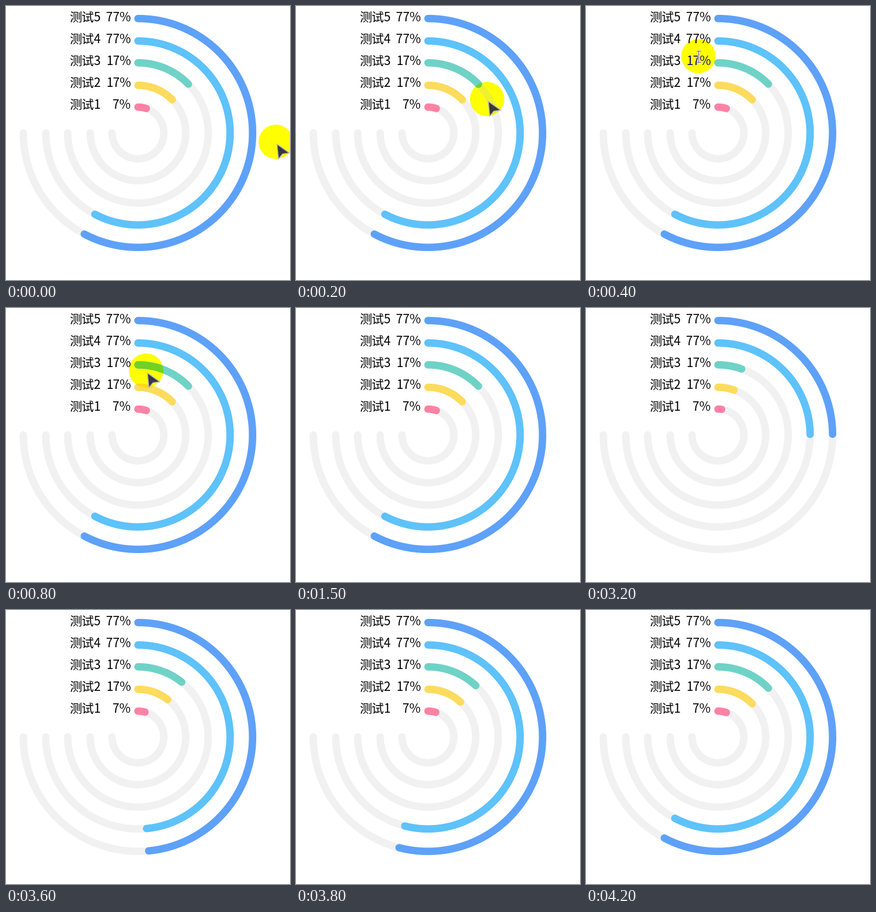
Animation of 480 by 464 pixels, one loop 5400 ms. Source, as a matplotlib script:

```python
import numpy as np
import matplotlib.pyplot as plt
from matplotlib.animation import FuncAnimation
from matplotlib.colors import to_rgb
from matplotlib.patches import Circle, Polygon

W, H, DPI = 480, 464, 64
PT = 72 / DPI                      # points per pixel
STEP, FRAMES = 100, 54
CX, CY = 223, 215
SWEEP, THICK, OUTER, GAP = 270, 12.5, 193.75, 37.5
FONT, FONT_PX = "Noto Sans CJK JP", 20.8
TRACK = "#f1f1f1"
SPOT = np.array([1, 1, 0.18])      # highlight tint, multiplied in

# rings from the outside in: percent and colour
RINGS = [(77, "#5ea1f9"), (77, "#5ec2fb"), (17, "#6fd2c7"),
         (17, "#fddb5c"), (7, "#fe82a5")]

# pointer stops: frame and highlight centre
STOPS = [(0, 456, 230), (4, 190, 85), (8, 237, 106), (11, 237, 106),
         (15, 216, 42)]
BLANK, SHOWN, DONE = 2700, 2900, 4200
GROW_START, GROW_TIME = 2960, 1400

fig = plt.figure(figsize=(W / DPI, H / DPI), dpi=DPI, facecolor="white")
ax = fig.add_axes([0, 0, 1, 1])
ax.set_xlim(0, W)
ax.set_ylim(H, 0)
ax.axis("off")


def arc(radius, degrees):
    """Points clockwise from twelve o'clock."""
    a = np.radians(np.linspace(0, degrees, int(degrees) + 2))
    return CX + radius * np.sin(a), CY - radius * np.cos(a)


def stroke(color, z):
    line, = ax.plot([], [], color=color, lw=THICK * PT, zorder=z,
                    solid_capstyle="round", solid_joinstyle="round")
    return line


def stroke_pair(color, z):
    """A line and the copy seen through the highlight."""
    return stroke(color, z), stroke(SPOT * to_rgb(color), z + 1)


def label(x, y, s, align):
    return ax.text(x, y, s, family=FONT, size=FONT_PX * PT, color="black",
                   ha=align, va="baseline", zorder=6)


def ibeam(color, width, z):
    line, = ax.plot([], [], color=color, lw=width * PT, zorder=z, marker="_",
                    ms=7 * PT, mew=width * PT)
    return line


spot = ax.add_patch(Circle((0, 0), 29, fc="#ffff00", ec="none", zorder=1))
ARROW = np.array([(0, 0), (21, 15), (9.5, 16.5), (2.5, 25)])
arrow = ax.add_patch(Polygon(ARROW, fc="#38383e", ec="#b4b4b4",
                             lw=1.5 * PT, joinstyle="round", zorder=8))
beams = [ibeam("#f4f4e0", 3, 8), ibeam("#74746a", 1.2, 9)]

chart, tinted, bars, values = [], [], [], []
for i, (pct, color) in enumerate(RINGS):
    r = OUTER - np.ceil(GAP * i)
    y = 26.3 + 37 * i
    track, track_tint = stroke_pair(TRACK, 2)
    bar, bar_tint = stroke_pair(color, 4)
    for t in (track, track_tint):
        t.set_data(*arc(r, SWEEP))
    bars.append((r, SWEEP * pct / 100, (bar, bar_tint)))
    value = label(210.8, y, f"{pct}%", "right")
    values.append((value, 190, y - 7))
    chart += [track, bar, value, label(107.6, y, f"测试{5 - i}", "left")]
    tinted += [track_tint, bar_tint]


def progress(ms):
    if ms < BLANK or ms >= DONE:
        return 1.0
    p = np.clip((ms - GROW_START) / GROW_TIME, 0, 1)
    return 1 - (1 - p) ** 3


def pointer(i):
    """Highlight centre, eased between stops, or None once it has left."""
    for (f0, *a), (f1, *b) in zip(STOPS, STOPS[1:]):
        if i < f1:
            t = (i - f0) / (f1 - f0)
            return np.array(a) + np.subtract(b, a) * t * t * (3 - 2 * t)
    return None


def draw_pointer(i):
    pos = pointer(i)
    on = pos is not None
    x, y = pos if on else (-W, -H)
    over_text = 105 < x < 212
    spot.center = (x, y)
    arrow.set_xy(ARROW + (x + 2, y + 4))
    arrow.set_visible(on and not over_text)
    for b in beams:
        b.set_data([x, x], [y - 9.5, y + 9.5])
        b.set_visible(on and over_text)
    spot.set_visible(on)
    for line in tinted:
        line.set_clip_path(spot)   # the clip does not follow a moved patch
        line.set_visible(on)
    for text, tx, ty in values:
        lit = np.hypot(tx - x, ty - y) < 22
        text.set_color("#14146e" if lit else "black")


def update(i):
    ms = i * STEP
    shown = not BLANK <= ms < SHOWN
    for a in chart:
        a.set_visible(shown)
    p = progress(ms)
    for r, full, pair in bars:
        for line in pair:
            line.set_data(*(arc(r, full * p) if p > 0 else ([], [])))
    draw_pointer(i)
    return []


anim = FuncAnimation(fig, update, frames=FRAMES, interval=STEP,
                     init_func=lambda: update(0), repeat=True,
                     repeat_delay=0, blit=False)
plt.show()
```
